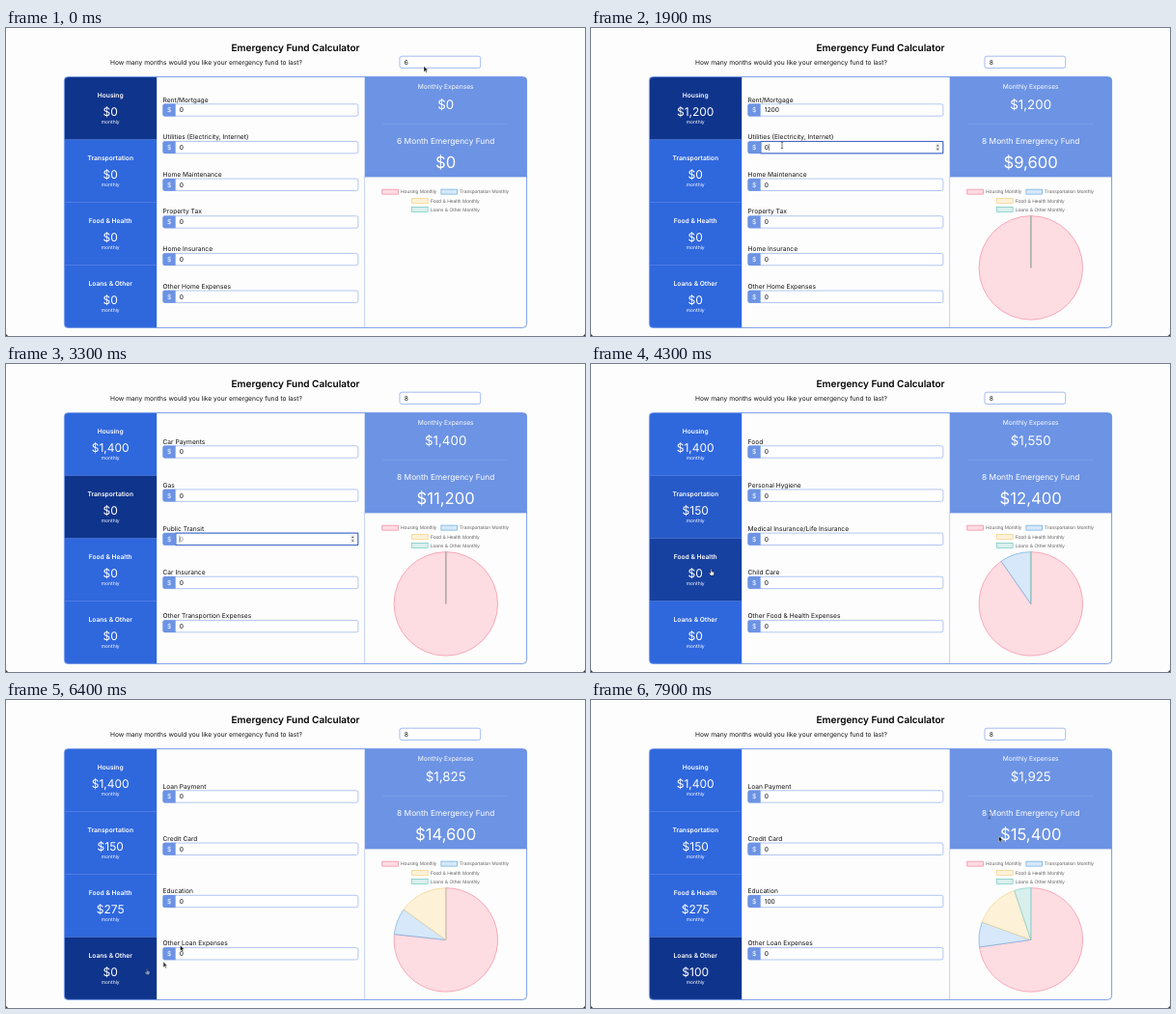
Animation, 600 px wide and 319 px high, one loop 8000 ms. Source, as an HTML page:

```html
<!DOCTYPE html>
<html lang="en">
<head>
<meta charset="utf-8">
<title>Emergency Fund Calculator</title>
<style>
  html, body { margin: 0; width: 100%; height: 100%; overflow: hidden; background: #fdfdfd; }
  svg { display: block; width: 100vw; height: 100vh; }
  text { font: 400 6.667px Inter, sans-serif; text-rendering: geometricPrecision; }
  .legend text { font: 5px "Liberation Sans", Arial, sans-serif; fill: #666; }
</style>
</head>
<body>
<svg id="stage" viewBox="0 0 600 319"></svg>
<script>
const LOOP = 8000, STEP = 100;
const stage = document.getElementById('stage');

const TABS = [
  { name: 'Housing', first: 85, gap: 38.65, fields: ['Rent/Mortgage', 'Utilities (Electricity, Internet)',
    'Home Maintenance', 'Property Tax', 'Home Insurance', 'Other Home Expenses'] },
  { name: 'Transportation', first: 91, gap: 45.15, fields: ['Car Payments', 'Gas', 'Public Transit',
    'Car Insurance', 'Other Transportion Expenses'] },
  { name: 'Food &amp; Health', first: 91, gap: 45.15, fields: ['Food', 'Personal Hygiene',
    'Medical Insurance/Life Insurance', 'Child Care', 'Other Food &amp; Health Expenses'] },
  { name: 'Loans &amp; Other', first: 100, gap: 54.25, fields: ['Loan Payment', 'Credit Card',
    'Education', 'Other Loan Expenses'] }
];
const FILLS = ['#fddce2', '#d6e8f9', '#fdf1d8', '#d8efec'];
const LINES = ['#f0768b', '#4f9fe0', '#f3cb74', '#5fc0bd'];

// Script of the session: [time, value...]
const MONTHS = [[0, 6], [400, 7], [600, 8]];
const VIEWS = [[-1000, 0], [2700, 1], [4200, 2], [6200, 3]];
const FOCUS = [[0, null], [300, 'month'], [1000, 0], [1800, 1], [2600, null], [3200, 2, 'start'], [3400, 2],
  [4200, null], [4800, 0], [5200, 1], [6200, null], [7300, 2], [7700, null]];
const EDITS = [ // time, tab, field, amount
  [1100, 0, 0, 1], [1200, 0, 0, 12], [1300, 0, 0, 120], [1400, 0, 0, 1200],
  [2000, 0, 1, 20], [2100, 0, 1, 200],
  [3400, 1, 2, 1], [3500, 1, 2, 15], [3600, 1, 2, 150],
  [5000, 2, 0, 20], [5100, 2, 0, 200], [5400, 2, 1, 7], [5500, 2, 1, 75],
  [7500, 3, 2, 1], [7600, 3, 2, 10], [7700, 3, 2, 100]
];
const MOUSE = [ // time, x, y, kind
  [0, 433, 39.5, 'arrow'], [100, 433, 39.5, 'arrow'], [300, 485, 33, 'arrow'], [600, 485, 33, 'arrow'],
  [700, 485, 33, 'arrow'], [1000, 205, 85, 'beam'], [1100, 205, 85, ''], [1500, 205, 85, 'beam'],
  [1800, 198, 121.5, 'beam'], [2000, 198, 121.5, ''], [2300, 198, 121.5, 'arrow'], [2600, 122, 150, 'hand'],
  [2800, 122, 150, 'arrow'], [3100, 198, 181, 'beam'], [3300, 198, 181, ''], [3800, 198, 181, 'arrow'],
  [4100, 124.5, 212.5, 'hand'], [4400, 124.5, 212.5, 'arrow'], [4700, 198, 91, 'beam'], [5000, 198, 91, ''],
  [5100, 198, 91, 'beam'], [5200, 198, 135.5, 'beam'], [5400, 198, 135.5, ''], [5900, 198, 135.5, 'arrow'],
  [6100, 146, 278, 'hand'], [6300, 146, 278, 'hand'], [6350, 163, 271, 'arrow'], [6400, 180.5, 254, 'arrow'],
  [6500, 184, 250, 'arrow'], [6800, 544, 208, 'arrow'], [6900, 544, 208, 'arrow'], [7200, 198, 208.5, 'beam'],
  [7400, 198, 208.5, ''], [7800, 413, 119.5, ''], [7850, 413, 119.5, 'beam'], [7900, 422.5, 141, 'arrow']
];

const last = (list, t) => list.filter(k => k[0] <= t).pop();
const money = n => '$' + n.toLocaleString('en-US');
const sum = a => a.reduce((x, y) => x + y, 0);
const mix = (a, b, k) => a + (b - a) * k;
const clamp = k => Math.max(0, Math.min(1, k));

const rect = (x, y, w, h, fill, extra = '') =>
  `<rect x="${x}" y="${y}" width="${w}" height="${h}" fill="${fill}" ${extra}/>`;
const line = (x1, y1, x2, y2, color, w) =>
  `<path d="M${x1} ${y1}L${x2} ${y2}" stroke="${color}" stroke-width="${w}"/>`;
const text = (s, x, y, { size = 6.667, weight = 400, fill = '#111', mid = false } = {}) =>
  `<text x="${x}" y="${y}" fill="${fill}" style="font-size:${size}px;font-weight:${weight}"` +
  `${mid ? ' text-anchor="middle"' : ''}>${s}</text>`;
const label = (s, x, y, size, weight = 400) => text(s, x, y, { size, weight, fill: '#fff', mid: true });

function amounts(t) {
  const v = TABS.map(tab => tab.fields.map(() => 0));
  for (const [at, tab, field, n] of EDITS) if (at <= t) v[tab][field] = n;
  return v;
}

function shares(t) {
  let cur = [0, 0, 0, 0];
  EDITS.forEach(([at], i) => {
    if (at > t) return;
    const end = i + 1 < EDITS.length ? Math.min(t, EDITS[i + 1][0]) : t;
    const k = 1 - (1 - clamp((end - at) / 300)) ** 4;
    const totals = amounts(at).map(sum), all = sum(totals);
    cur = cur.map((c, j) => mix(c, totals[j] / all, k));
  });
  return cur;
}

function pie(t) {
  if (t < EDITS[0][0]) return '';
  const cx = 455.8, cy = 248.4, r = 53.8;
  const at = a => `${cx + r * Math.sin(a * 2 * Math.PI)} ${cy - r * Math.cos(a * 2 * Math.PI)}`;
  let a = 0;
  return shares(t).map((s, i) => {
    const b = a + s;
    const arc = p => `A${r} ${r} 0 0 1 ${at(p)}`;
    const d = `M${cx} ${cy}L${at(a)}${arc((a + b) / 2)}${arc(b)}Z`;
    a = b;
    return `<path d="${d}" fill="${FILLS[i]}" stroke="${LINES[i]}" stroke-width=".55" ` +
      `stroke-opacity="${s < .001 ? .45 : 1}" stroke-linejoin="bevel"/>`;
  }).join('');
}

function tiles(t, values) {
  const now = VIEWS.filter(v => v[0] <= t).reverse();
  const k = 1 - (1 - clamp((t - now[0][0]) / 200)) ** 2;
  return TABS.map((tab, i) => {
    const y = 50.7 + i * 65;
    const dark = i === now[0][1] ? k : now[1] && i === now[1][1] ? 1 - k : 0;
    const c = [[47, 103, 221], [15, 52, 140]];
    const fill = `rgb(${c[0].map((n, j) => Math.round(mix(n, c[1][j], dark)))})`;
    return rect(60.5, y, 95.7, 65.1, fill) + line(60.5, y + 64.9, 156.2, y + 64.9, '#5c88e8', .45) +
      label(tab.name, 108.2, y + 21.5, 6.667, 600) +
      label(money(sum(values[i])), 108.2, y + 40.6, 12) +
      label('monthly', 108.2, y + 48.4, 5);
  }).join('');
}

function spinner(x, y) {
  return rect(x - 2.1, y - 4.3, 4.2, 8.6, '#ececec', 'rx="1"') +
    `<path d="M${x - 1.2} ${y - 1.2}l1.2-1.6 1.2 1.6zm0 2.4l1.2 1.6 1.2-1.6z" fill="#444"/>`;
}

function form(t, values, mouse) {
  const view = last(VIEWS, t)[1], tab = TABS[view], [, focus, caret] = last(FOCUS, t);
  return tab.fields.map((name, i) => {
    const y = tab.first + i * tab.gap, on = focus === i, val = String(values[view][i]);
    const over = mouse.kind && mouse.x > 176 && mouse.x < 365 && Math.abs(mouse.y + 2 - y) < 6.4;
    let s = text(name, 162.5, y - 8.5) +
      rect(162.7, y - 6.2, 202.2, 12.4, '#fff', 'rx="2" stroke="#7fa0ea" stroke-width=".6"') +
      `<path d="M175.7 ${y - 6.4}h-11.2a2 2 0 0 0-2 2v8.8a2 2 0 0 0 2 2h11.2z" fill="#6c93e4"/>` +
      label('$', 169.1, y + 2.4, 6.667);
    if (on) s += rect(176, y - 6.2, 188.8, 12.4, 'none', 'stroke="#3f66c4" stroke-width="1"');
    if (on || over) s += spinner(359.3, y);
    s += text(val, 179.7, y + 2.4, { fill: caret && on ? '#999' : '#111' });
    if (on) {
      const x = caret ? 179.9 : 180.4 + val.length * 4.1;
      s += line(x, y - 3.6, x, y + 3.6, '#222', .5);
    }
    return s;
  }).join('');
}

function totals(t, values) {
  const months = last(MONTHS, t)[1], all = sum(values.map(sum)), on = last(FOCUS, t)[1] === 'month';
  return rect(408, 29.2, 83.7, 12.2, '#fff',
      `rx="2" stroke="${on ? '#3f66c4' : '#7fa0ea'}" stroke-width="${on ? 1 : .7}"`) +
    (on ? spinner(486, 35.3) : '') + text(months, 412.7, 37.7) +
    label('Monthly Expenses', 455.7, 63.2, 6.667) +
    label(money(all), 455.7, 84.2, 13.333) +
    label(months + ' Month Emergency Fund', 455.7, 120.4, 8.333) +
    label(money(all * months), 455.7, 145.3, 16.667);
}

function mouseAt(t) {
  const i = MOUSE.filter(m => m[0] <= t).length - 1, a = MOUSE[i], b = MOUSE[i + 1] || a;
  const k = b === a ? 0 : (t - a[0]) / (b[0] - a[0]);
  return { x: mix(a[1], b[1], k), y: mix(a[2], b[2], k), kind: a[3] };
}

const SHAPES = {
  arrow: '<path d="M0 0V5.9L1.4 4.7 2.3 6.7 3.3 6.2 2.4 4.3H4.2Z" fill="#111" stroke="#fff" stroke-width=".4"/>',
  hand: '<path d="M-.5 .3Q0-.4.5.3V2.4L3 3V4.8L2.3 6.6H-.6L-2.2 4 -1.6 3.4 -.5 4.2Z" fill="#fff" stroke="#222" stroke-width=".5"/>',
  beam: '<path d="M-1.2-3.3Q0-3.3 0-2.5 0-3.3 1.2-3.3M0-2.7V2.7M-1.2 3.3Q0 3.3 0 2.5 0 3.3 1.2 3.3" fill="none" stroke="#333" stroke-width=".65"/>'
};

// Fast moves leave a short blended trail.
function pointer(t, mouse) {
  const put = (m, o) => m.kind ? `<g transform="translate(${m.x} ${m.y})" opacity="${o}">${SHAPES[m.kind]}</g>` : '';
  const trail = [[100, .5], [50, .85]].map(([ago, o]) => {
    const m = mouseAt(Math.max(0, t - ago));
    return Math.hypot(m.x - mouse.x, m.y - mouse.y) > 4 ? put(m, o) : '';
  });
  return trail.join('') + put(mouse, 1);
}

function legend() {
  const at = [[389.8, 169.6], [450.9, 169.6], [420.5, 178.8], [420.5, 187.9]];
  return '<g class="legend">' + at.map(([x, y], i) =>
    rect(x, y - 2.5, 16.67, 5, FILLS[i], `stroke="${LINES[i]}" stroke-width=".6"`) +
    `<text x="${x + 19.2}" y="${y + 1.8}">${TABS[i].name} Monthly</text>`).join('') + '</g>';
}

const backdrop = rect(0, 0, 600, 319, '#fdfdfd') +
  text('Emergency Fund Calculator', 300, 23.6, { size: 10, weight: 600, fill: '#000', mid: true }) +
  text('How many months would you like your emergency fund to last?', 108, 37.7) +
  '<path d="M0 316.5V319H2.5Q.5 318.5 0 316.5ZM600 316.5V319H597.5Q599.5 318.5 600 316.5Z" fill="#222"/>' +
  '<clipPath id="card"><rect x="60.2" y="50.4" width="479.6" height="260.2" rx="4"/></clipPath>';
const panel = rect(60, 50, 480, 261, '#fdfdfd') + rect(371.7, 50.4, 168.3, 104, '#6c93e4') +
  line(390, 99.3, 521, 99.3, '#86a7ea', .5) + line(371.6, 154, 371.6, 311, '#9db7f0', .6) + legend();
const frame = rect(60.4, 50.6, 479.2, 259.8, 'none', 'rx="4" stroke="#6c93e8" stroke-width=".9"');

function draw(t) {
  const values = amounts(t), mouse = mouseAt(t);
  stage.innerHTML = backdrop + `<g clip-path="url(#card)">${panel}${tiles(t, values)}</g>` + frame +
    form(t, values, mouse) + totals(t, values) + pie(t) + pointer(t, mouse);
}

let shown = -1;
const start = performance.now();
function tick() {
  const t = Math.floor(((performance.now() - start) % LOOP) / STEP) * STEP;
  if (t !== shown) draw(shown = t);
  requestAnimationFrame(tick);
}
tick();
</script>
</body>
</html>
```
